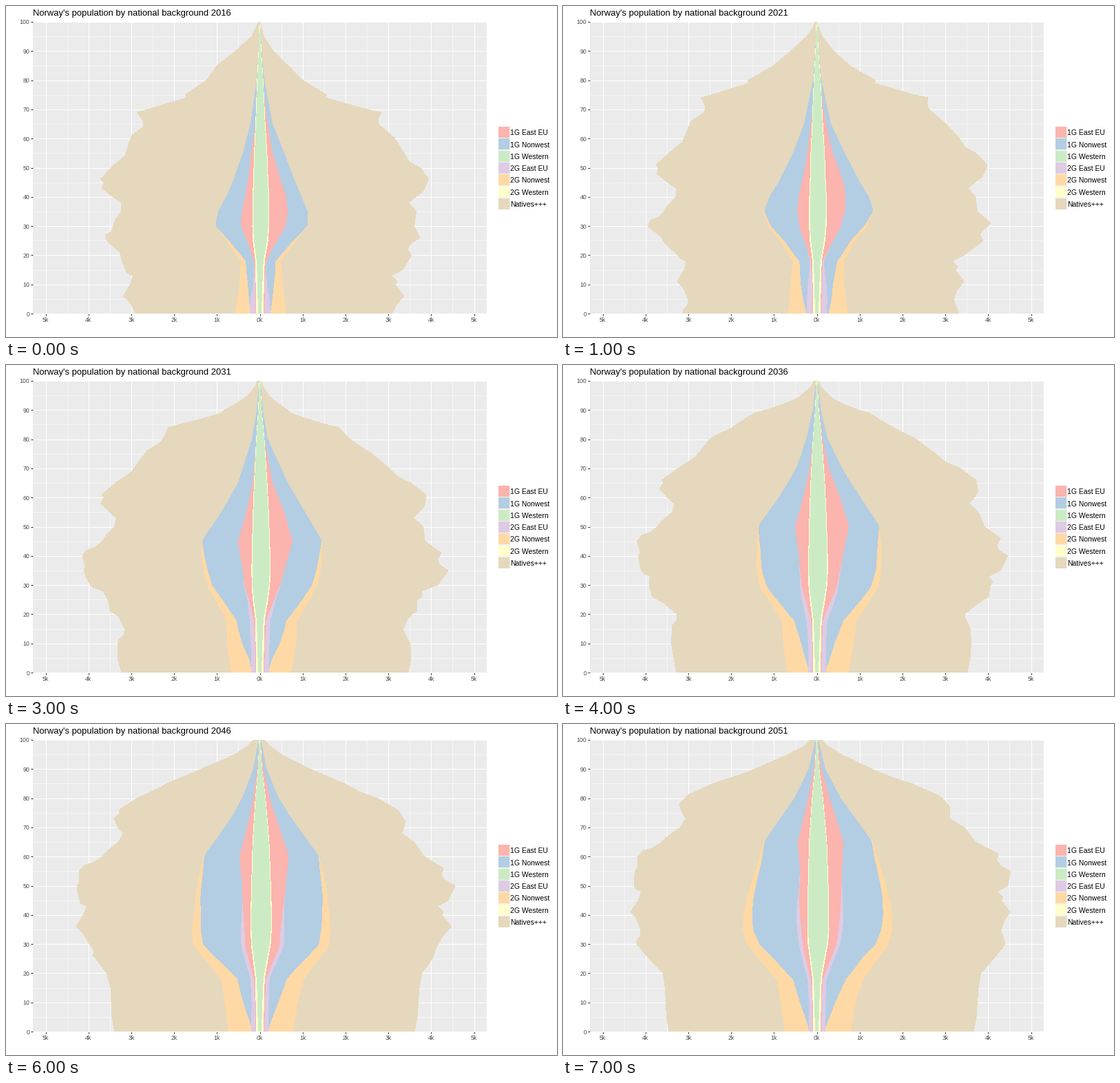
Animation, 800 px wide and 480 px high, one loop 8 s. Source, as a matplotlib script:

```python
import numpy as np
import matplotlib.pyplot as plt
from matplotlib.animation import FuncAnimation
from matplotlib.patches import Polygon, Rectangle

W, H, DPI = 800, 480, 100
CX, K = 368.5, 62.2            # centre line and pixels per thousand
LEFT, RIGHT, TOP, BASE = 39, 698, 23, 446
PX = 72 / DPI
FONT = "Liberation Sans"
AGES = np.arange(101)
START, END = 2016, 2051
YEARS = range(START, END + 1, 5)

RED, BLUE, GREEN, LILAC, ORANGE, YELLOW, TAN = (
    "#FBB4AE", "#B3CDE3", "#CCEBC5", "#DECBE4", "#FED9A6", "#FFFFCC", "#E5D8BD")
STACK = [GREEN, YELLOW, RED, LILAC, BLUE, ORANGE, TAN]   # from the centre outwards
KEYS = [("1G East EU", RED), ("1G Nonwest", BLUE), ("1G Western", GREEN),
        ("2G East EU", LILAC), ("2G Nonwest", ORANGE), ("2G Western", YELLOW),
        ("Natives+++", TAN)]


def curve(x, pairs):
    return np.interp(x, pairs[::2], pairs[1::2])


# Whole population: birth cohorts that gain by migration and shrink by mortality.
GAIN = curve(AGES, [0, 0, 5, 7, 15, 16, 20, 22.5, 25, 44, 30, 67, 35, 76, 50, 86])
OLD = [50, 60, 65, 70, 75, 80, 85, 90, 95, 98, 100]
ALIVE = {-1: [1, .985, .968, .93, .875, .81, .665, .41, .175, .07, .035],
         1: [1, .98, .94, .89, .81, .71, .55, .33, .14, .055, .025]}
OUTLINE = {
    -1: [0, 180, 4, 189, 6, 198, 10, 188, 13, 184, 14, 193, 18, 200, 21, 203, 25, 222,
         27, 224, 28, 215, 32, 210, 35, 201, 38, 201, 40, 213, 43, 229, 45, 226,
         46, 231, 50, 216, 54, 196, 61, 186, 64, 169, 66, 169, 69, 178, 70, 162,
         74, 106, 75, 108, 80, 77, 85, 62, 90, 35, 95, 11.5, 100, 1.5],
    1: [0, 192, 3, 198, 6, 209, 10, 196, 11, 199, 13, 191, 15, 207, 20, 220, 22, 214,
        24, 219, 26, 232, 30, 224, 35, 227, 38, 216, 40, 226, 42, 237, 46, 245,
        50, 233, 52, 217, 60, 196, 65, 172, 67, 172, 69, 176, 70, 155, 74, 95,
        75, 97, 80, 62, 85, 41, 90, 19, 95, 5.5, 100, .5]}
BIRTHS = {-1: [2016, 180, 2018, 183, 2020, 193, 2026, 199.5, 2031, 200.5, 2051, 214.5],
          1: [2016, 192, 2017, 194, 2021, 206.5, 2026, 212.5, 2031, 215.5, 2051, 227.5]}


def survival(year, sign):
    return np.interp(AGES, OLD, ALIVE[sign]) ** (1 - 0.006 * (year - 2031))


def population(year, sign):
    first = curve(AGES, OUTLINE[sign]) / survival(START, sign) - GAIN
    born = year - AGES
    size = np.where(born > START, curve(born, BIRTHS[sign]),
                    first[np.clip(START - born, 0, 100)])
    return (size + GAIN) * survival(year, sign)


# Immigrant layers: distances from the centre at a few ages.
YOUNG, ADULT = [0, 10, 18], [25, 30, 35, 40, 45, 55, 65, 80]
RED_YOUNG = {-1: [5.5, 6, 8], 1: [6, 7, 8.5]}
RED_EDGE = {
    -1: {2016: [18, 27, 26, 21, 17, 12, 6, 2],
         2031: [15, 22, 24, 28, 31, 19, 10, 4],
         2051: [16, 20, 22, 24, 25, 24, 27, 12]},
    1: {2016: [24, 37, 40, 38, 31, 18, 11, 3],
        2031: [20, 29, 35, 41, 47, 35, 18, 6],
        2051: [20, 28, 31, 33, 35, 36, 38, 18]}}
ORANGE_EDGE = {
    -1: {2016: [35, 29, 27, 48, 64, 60, 48, 39, 24, 13, 4],
         2021: [41, 38, 34, 53, 70, 76, 68, 55, 34, 18, 5],
         2031: [42, 47, 48, 64, 76, 81, 84, 84, 55, 31, 11],
         2051: [46, 52, 58, 84, 101, 107, 106, 102, 89, 76, 32]},
    1: {2016: [38, 33, 30, 52, 69, 69, 60, 51, 35, 18, 6],
        2021: [45, 39, 39, 55, 72, 82, 75, 62, 40, 20, 6],
        2031: [45, 52, 54, 72, 83, 88, 90, 90, 65, 40, 11],
        2051: [49, 56, 67, 88, 104, 109, 109, 106, 94, 80, 34]}}
GREEN_START = [2, 3, 4, 8, 9, 9, 9, 8, 7, 5, 3]
GREEN_END = [2, 3, 4, 8, 11, 12, 12, 12, 11, 10, 6]
# Second generation widths by year of birth, thinning out with age.
ORANGE_BORN = [1985, 0, 1991, 6, 1996, 9, 2001, 11, 2006, 15, 2016, 22, 2026, 32,
               2031, 32, 2051, 37]
LILAC_BORN = [1996, 0, 2001, 1, 2006, 3.5, 2011, 8, 2016, 9, 2026, 7, 2051, 6]
THIN = curve(AGES, [0, 1, 10, .82, 20, .72, 30, .68])


def by_age(values):
    tail = [values[-1] * 0.35, values[-1] * 0.05]
    return np.interp(AGES, YOUNG + ADULT + [90, 100], list(values) + tail)


def at_year(table, year, young=()):
    """Blend key years: adults age with their cohort, the rest stay put."""
    y0 = max(y for y in table if y <= year)
    y1 = min(y for y in table if y >= year)
    before, after = (by_age([*young, *table[y]]) for y in (y0, y1))
    if y0 == y1:
        return before
    f = (year - y0) / (y1 - y0)
    same_age = before ** (1 - f) * after ** f
    cohort = (before[np.clip(AGES - (year - y0), 0, 100)] ** (1 - f)
              * after[np.clip(AGES + (y1 - year), 0, 100)] ** f)
    w = np.interp(AGES, [28, 42, 70, 85], [0, 1, 1, 0])
    bulge = 0.01 * (y1 - y0) * f * (1 - f) * np.interp(AGES, [18, 30], [0, 1])
    return (same_age * (1 - w) + cohort * w) * (1 + bulge)


def layers(year, sign):
    """Edges of all layers on one side, from the centre outwards."""
    t = (year - START) / (END - START)
    green = by_age(GREEN_START) * (1 - t) + by_age(GREEN_END) * t
    if sign > 0:
        green = green * np.interp(AGES, [0, 35], [1, 1.35])
    yellow = green + curve(AGES, [0, 3, 18, 2, 40, 1.1, 70, .8, 100, .2])
    red = at_year(RED_EDGE[sign], year, RED_YOUNG[sign])
    lilac = red + curve(year - AGES, LILAC_BORN) * THIN
    orange = at_year(ORANGE_EDGE[sign], year)
    wider = 1.06 if sign > 0 else 1
    blue = orange - curve(year - AGES, ORANGE_BORN) * THIN * wider
    rows = [green, yellow, red, lilac, blue, orange, population(year, sign)]
    return np.maximum.accumulate(rows, axis=0)


def age_y(age):
    return BASE - (BASE - TOP) * age / 100


fig = plt.figure(figsize=(W / DPI, H / DPI), dpi=DPI, facecolor="white")
ax = fig.add_axes([0, 0, 1, 1])
ax.set(xlim=(0, W), ylim=(H, 0))
ax.axis("off")


def line(xs, ys, color, width):
    ax.plot(xs, ys, color=color, lw=width * PX, solid_capstyle="butt", zorder=1)


def label(x, y, text, size, color="black", ha="left", va="center_baseline"):
    return ax.text(x, y, text, fontsize=size * PX, color=color, ha=ha, va=va,
                   family=FONT)


def box(x, y, w, h, color):
    ax.add_patch(Rectangle((x, y), w, h, fc=color, lw=0, zorder=0.5))


box(LEFT, TOP, RIGHT - LEFT, BASE - TOP, "#EBEBEB")
for half in range(-10, 11):
    x = CX + half * K / 2
    line([x, x], [TOP, BASE], "white", 0.53 if half % 2 else 1.07)
    if half % 2 == 0:
        line([x, x], [BASE, BASE + 3], "#333333", 1.07)
        label(x, 455, f"{abs(half) // 2}k", 8.8, "#4D4D4D", "center")
for age in range(0, 101, 5):
    y = age_y(age)
    line([LEFT, RIGHT], [y, y], "white", 0.53 if age % 10 else 1.07)
    if age % 10 == 0:
        line([LEFT - 3, LEFT], [y, y], "#333333", 1.07)
        label(34.3, y, str(age), 8.8, "#4D4D4D", "right")
for i, (name, color) in enumerate(KEYS):
    y = 174.5 + 17.28 * i
    box(714.5, y, 17.28, 17.28, "#F2F2F2")
    box(715, y + 0.7, 16, 15.9, color)
    label(732, y + 8.8, name, 10.4)

title = label(39, 14, "", 13, va="baseline")
shapes = [ax.add_patch(Polygon([(0, 0)] * 3, fc=color, lw=0, aa=False, zorder=2))
          for color in reversed(STACK)]


def draw(i):
    year = YEARS[i]
    title.set_text(f"Norway's population by national background {year}")
    ys = age_y(AGES)
    for shape, l, r in zip(shapes, layers(year, -1)[::-1], layers(year, 1)[::-1]):
        shape.set_xy(np.column_stack([np.r_[CX - l, (CX + r)[::-1]],
                                      np.r_[ys, ys[::-1]]]))
    return [title, *shapes]


anim = FuncAnimation(fig, draw, frames=len(YEARS), interval=1000, repeat=True,
                     repeat_delay=0, blit=False)
plt.show()
```
